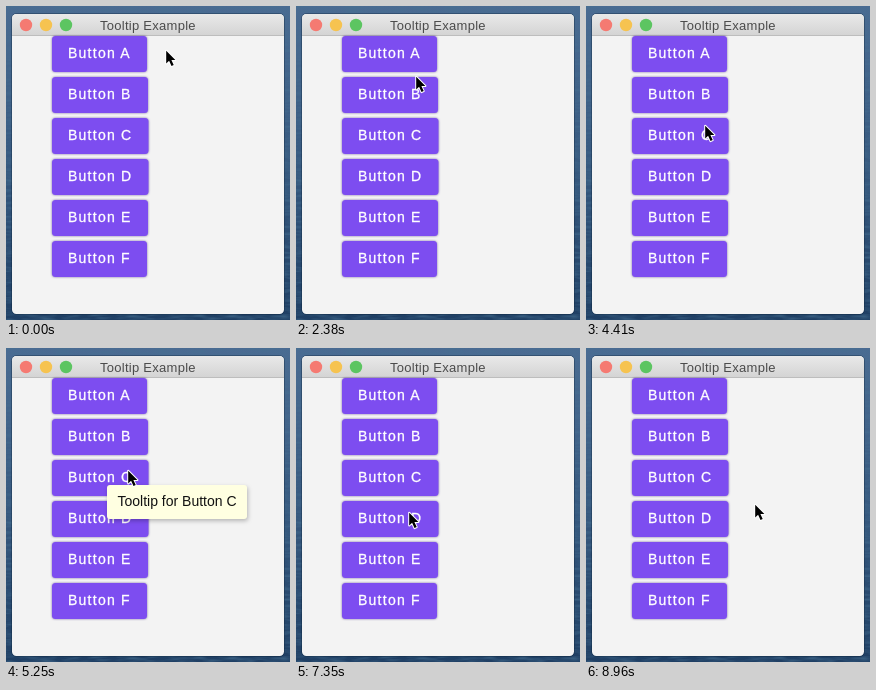
An HTML page that plays this animation: 284 px wide and 314 px high, repeating every 9030 ms.

```html
<!DOCTYPE html>
<html lang="en">
<head>
<meta charset="utf-8">
<title>Tooltip Example</title>
<style>
  html, body { margin: 0; width: 100%; height: 100%; overflow: hidden; background: #2c4f76; }
  svg { display: block; width: 284px; height: 314px; }
  text { font-family: "Liberation Sans", Arial, sans-serif; font-kerning: normal; }
  .title { font-size: 13px; letter-spacing: .27px; fill: #4b4b4b; }
  .btn text { font-size: 14px; letter-spacing: 1.25px; fill: #fff; stroke: #fff; stroke-width: .3px; }
  .btn rect { fill: #7d4df0; filter: drop-shadow(0 .5px 1px rgba(50, 20, 120, .6)); }
  .tip { visibility: hidden; animation: 9030ms step-end infinite; }
  .tip rect { fill: #ffffe1; filter: drop-shadow(1px 2px 2px rgba(0, 0, 0, .25)); }
  .tip text { font-size: 14px; fill: #111; }
  .tip.a { animation-name: tip-a; }
  .tip.b { animation-name: tip-b; }
  .tip.c { animation-name: tip-c; }
  .tip.d { animation-name: tip-d; }
  #cursor { animation: move 9030ms linear infinite; }

  @keyframes tip-a { 16.2% { visibility: visible } 24.8%, 100% { visibility: hidden } }
  @keyframes tip-b { 34.05% { visibility: visible } 44.9%, 100% { visibility: hidden } }
  @keyframes tip-c { 58.1% { visibility: visible } 75.9%, 100% { visibility: hidden } }
  @keyframes tip-d { 87.55% { visibility: visible } 99%, 100% { visibility: hidden } }

  @keyframes move {
    0% { transform: translate(159px, 43px) }
    5.8% { transform: translate(159px, 43px); animation-timing-function: ease-out }
    14.7%, 21.4% { transform: translate(117px, 45px); animation-timing-function: ease-out }
    26.36% { transform: translate(119px, 69px); animation-timing-function: ease-in-out }
    30.6%, 39.3% { transform: translate(120px, 93px); animation-timing-function: ease-out }
    48.84% { transform: translate(118px, 118px) }
    55.4%, 67.3% { transform: translate(121px, 121px) }
    71.32% { transform: translate(116px, 136px) }
    74.2% { transform: translate(115px, 148px) }
    79.07% { transform: translate(113px, 153px) }
    81.39%, 96.4% { transform: translate(112px, 163px) }
    99.22%, 100% { transform: translate(168px, 155px) }
  }
</style>
</head>
<body>
<svg viewBox="0 0 284 314">
  <defs>
    <linearGradient id="sea" x2="0" y2="1">
      <stop stop-color="#4a6b92"/>
      <stop offset=".5" stop-color="#37597f"/>
      <stop offset="1" stop-color="#1f3f64"/>
    </linearGradient>
    <linearGradient id="bar" x2="0" y2="1">
      <stop stop-color="#e9e9e9"/>
      <stop offset="1" stop-color="#d3d3d3"/>
    </linearGradient>
    <filter id="waves" x="0" y="0" width="1" height="1">
      <feTurbulence type="fractalNoise" baseFrequency=".06 .3" numOctaves="2" seed="4"/>
      <feColorMatrix values="0 0 0 0 .06  0 0 0 0 .16  0 0 0 0 .28  1.4 0 0 0 -.55"/>
    </filter>
  </defs>

  <rect width="284" height="314" fill="url(#sea)"/>
  <rect width="284" height="314" filter="url(#waves)"/>

  <rect x="5.5" y="7.5" width="273" height="301" rx="5" fill="none" stroke="#0a2038" stroke-opacity=".35"/>
  <rect x="6" y="8" width="272" height="300" rx="4.5" fill="#f3f3f3"/>
  <path d="M6 30V12.500a4.500 4.500 0 0 1 4.500-4.500h263a4.500 4.500 0 0 1 4.500 4.500V30z" fill="url(#bar)"/>
  <path d="M6 29.500h272" stroke="#bdbdbd"/>
  <circle cx="20" cy="19" r="6.200" fill="#f57a72"/>
  <circle cx="40" cy="19" r="6.200" fill="#f6c350"/>
  <circle cx="60" cy="19" r="6.200" fill="#5cc561"/>
  <text class="title" x="94" y="24">Tooltip Example</text>

  <g id="buttons"></g>
  <g id="tips"></g>

  <g id="cursor">
    <path d="M1.200 1.800V14.600l2.900-2.800 2.400 5.300 2.200-1-2.300-5.100h4z" fill="#000" stroke="#fff" stroke-width="2" stroke-linejoin="round" paint-order="stroke"/>
  </g>
</svg>
<script>
  const widths = { A: 95, B: 96, C: 96.5, D: 96.5, E: 96, F: 95 };
  const tips = { A: [98, 61], B: [100, 109], C: [101, 137], D: [92, 179] };

  const button = ([name, w], i) => `<g class="btn" transform="translate(46 ${30 + 41 * i})">
    <rect width="${w}" height="36" rx="3.500"/>
    <text x="16" y="22">Button ${name}</text></g>`;

  const tip = ([name, [x, y]]) => `<g class="tip ${name.toLowerCase()}" transform="translate(${x} ${y})">
    <rect width="140" height="34" rx="3"/>
    <text x="10.500" y="21">Tooltip for Button ${name}</text></g>`;

  const fill = (id, items, draw) =>
    document.getElementById(id).innerHTML = Object.entries(items).map(draw).join("");

  fill("buttons", widths, button);
  fill("tips", tips, tip);
</script>
</body>
</html>
```
